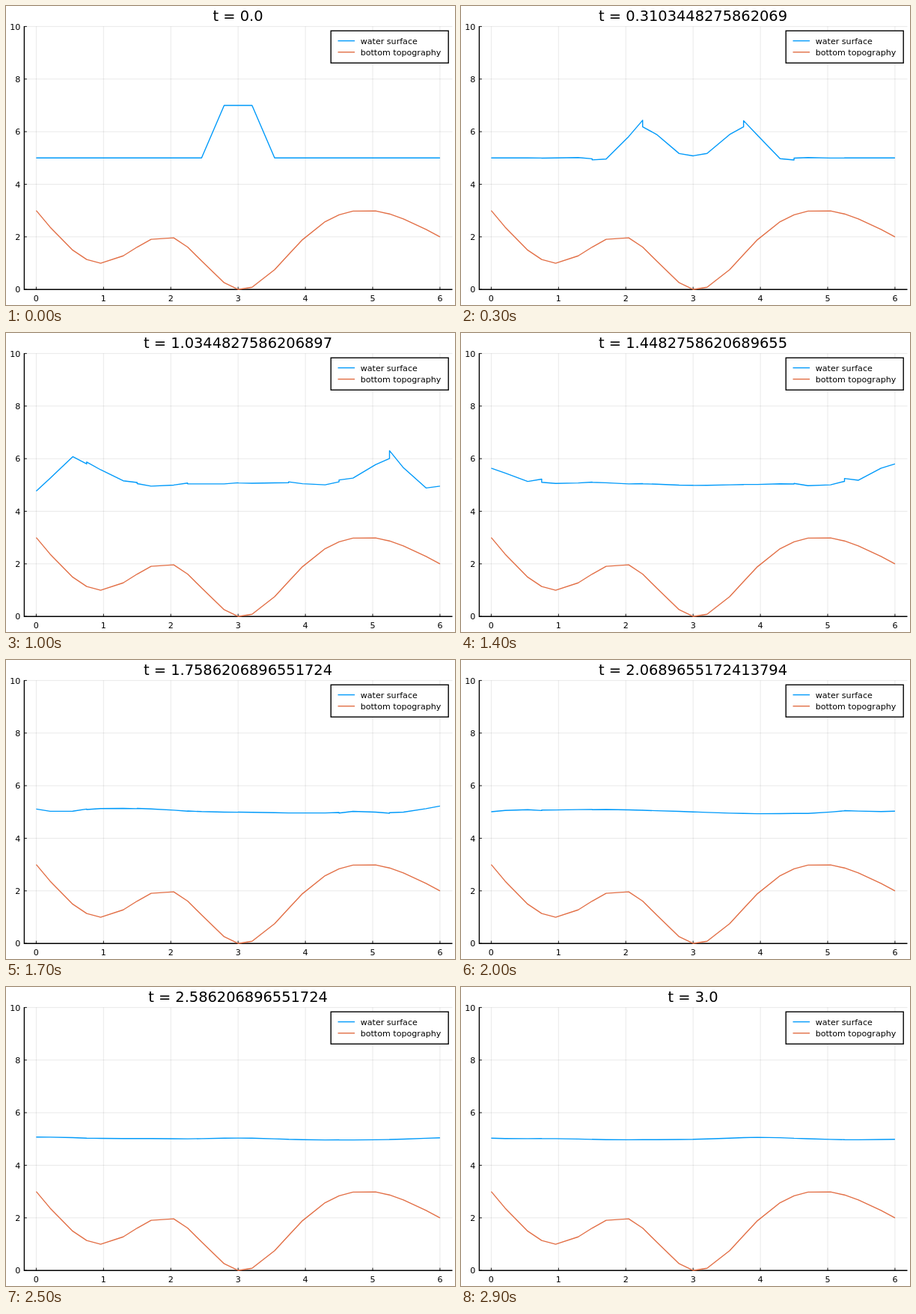
An HTML page that plays this animation: 600 px wide and 400 px high, repeating every 3000 ms.

```html
<!DOCTYPE html>
<html lang="en">
<head>
<meta charset="utf-8">
<title>Shallow water wave</title>
<style>
  html, body { margin: 0; width: 100%; height: 100%; overflow: hidden; background: #fff; }
  svg { display: block; width: 600px; height: 400px; font: 11.1px "DejaVu Sans", sans-serif; }
  path { fill: none; }
  .grid { stroke: #000; stroke-opacity: .1; stroke-width: .9; }
  .axis { stroke: #000; stroke-width: 1.4; }
  .tick { stroke: #000; stroke-width: .9; }
  .water, .bottom { stroke-width: 1.4; stroke-linejoin: round; }
  .water { stroke: #009afa; }
  .bottom { stroke: #e26f46; }
  #title { font-size: 19.4px; }
</style>
</head>
<body>
<svg viewBox="0 0 600 400">
  <path id="grid" class="grid"/>
  <path class="axis" d="M24.4 27V379.2H596.5"/>
  <path id="ticks" class="tick"/>
  <g id="labels"></g>
  <text id="title" x="310" y="19.7" text-anchor="middle"></text>
  <path id="water" class="water"/>
  <path id="bottom" class="bottom"/>
  <rect x="434.2" y="33.2" width="157" height="43" fill="#fff" stroke="#000" stroke-width="1.4"/>
  <path class="water" d="M443.5 46.6H466"/>
  <path class="bottom" d="M443.5 61.7H466"/>
  <text x="473.7" y="50.6">water surface</text>
  <text x="473.7" y="65.7">bottom topography</text>
</svg>
<script>
const $ = id => document.getElementById(id);
const px = x => 40.4 + 89.92 * x;
const py = y => 379.2 - 35.18 * y;

// Discontinuous Galerkin grid: 8 elements with 4 Gauss-Lobatto nodes each
const CELLS = 8, P = 4, SIZE = CELLS * P, LENGTH = 6;
const half = LENGTH / CELLS / 2;
const nodes = [-1, -Math.sqrt(0.2), Math.sqrt(0.2), 1];
const endWeight = 1 / 6;
const gravity = 1, restLevel = 5, humpLevel = 7;
const FRAMES = 30, FRAME_MS = 100, END = 3, SUBSTEPS = 40;

const bary = nodes.map((a, i) =>
  1 / nodes.reduce((p, b, j) => i === j ? p : p * (a - b), 1));
const D = nodes.map((a, i) => {
  const row = nodes.map((b, j) => i === j ? 0 : bary[j] / bary[i] / (a - b));
  row[i] = -row.reduce((s, v) => s + v, 0);
  return row;
});

// Natural cubic spline through unit-spaced heights
function spline(y) {
  const m = y.map(() => 0);
  for (let sweep = 0; sweep < 60; sweep++)
    for (let i = 1; i < y.length - 1; i++)
      m[i] = (6 * (y[i - 1] - 2 * y[i] + y[i + 1]) - m[i - 1] - m[i + 1]) / 4;
  return x => {
    const i = Math.min(Math.floor(x), y.length - 2), b = x - i, a = 1 - b;
    return a * y[i] + b * y[i + 1] +
      ((a ** 3 - a) * m[i] + (b ** 3 - b) * m[i + 1]) / 6;
  };
}

const xs = Array.from({ length: SIZE }, (_, i) =>
  half * (2 * Math.floor(i / P) + 1 + nodes[i % P]));
const bed = xs.map(spline([3, 1, 2, 0, 2, 3, 2]));

const flux = (h, q) => [q, q * q / h + gravity * h * h / 2];

// Local Lax-Friedrichs flux
function interfaceFlux(hl, ql, hr, qr) {
  const speed = Math.max(Math.abs(ql / hl), Math.abs(qr / hr)) +
    Math.sqrt(gravity * Math.max(hl, hr));
  const l = flux(hl, ql), r = flux(hr, qr);
  return [(l[0] + r[0] - speed * (hr - hl)) / 2,
          (l[1] + r[1] - speed * (qr - ql)) / 2];
}

// State holds depths first, then discharges
function rate(u) {
  const out = new Float64Array(2 * SIZE);
  for (let i = 0; i < SIZE; i++) {
    const first = i - i % P, h = u[i], q = u[SIZE + i];
    let dh = 0, dq = 0;
    for (let j = 0; j < P; j++) {
      const k = first + j, hk = u[k], qk = u[SIZE + k], d = D[i % P][j];
      dh += d * (q + qk);
      dq += d * ((q + qk) * (q / h + qk / hk) / 2 + gravity * h * (hk + bed[k]));
    }
    out[i] = -dh / half;
    out[SIZE + i] = -dq / half;
  }
  const correct = (i, star, sign) => {
    const own = flux(u[i], u[SIZE + i]), scale = sign / (endWeight * half);
    out[i] -= scale * (star[0] - own[0]);
    out[SIZE + i] -= scale * (star[1] - own[1]);
  };
  for (let c = 0; c <= CELLS; c++) {
    const r = c * P, l = r - 1;
    const left = c > 0 ? [u[l], u[SIZE + l]] : [restLevel - bed[0], 0];
    const right = c < CELLS ? [u[r], u[SIZE + r]] : [restLevel - bed[SIZE - 1], 0];
    const star = interfaceFlux(...left, ...right);
    if (c > 0) correct(l, star, 1);
    if (c < CELLS) correct(r, star, -1);
  }
  return out;
}

// Classic fourth-order Runge-Kutta
function step(u, dt) {
  const add = (k, s) => u.map((v, i) => v + s * k[i]);
  const a = rate(u), b = rate(add(a, dt / 2)), c = rate(add(b, dt / 2)), d = rate(add(c, dt));
  return u.map((v, i) => v + dt / 6 * (a[i] + 2 * b[i] + 2 * c[i] + d[i]));
}

const line = ys => "M" + xs.map((x, i) =>
  px(x).toFixed(2) + " " + py(ys[i]).toFixed(2)).join("L");

function simulate() {
  let u = new Float64Array(2 * SIZE);
  xs.forEach((x, i) => {
    u[i] = (Math.abs(x - 3) < 0.25 ? humpLevel : restLevel) - bed[i];
  });
  const dt = END / (FRAMES - 1) / SUBSTEPS, lines = [];
  for (let f = 0; f < FRAMES; f++) {
    lines.push(line(bed.map((b, i) => b + u[i])));
    for (let s = 0; s < SUBSTEPS; s++) u = step(u, dt);
  }
  return lines;
}

function drawAxes() {
  let grid = "", ticks = "", labels = "";
  for (let x = 0; x <= 6; x++) {
    grid += `M${px(x)} 27.4V379.2`;
    ticks += `M${px(x)} 379.2v-3.5`;
    labels += `<text x="${px(x)}" y="394.6" text-anchor="middle">${x}</text>`;
  }
  for (let y = 0; y <= 10; y += 2) {
    grid += `M24.4 ${py(y)}H596.5`;
    ticks += `M24.4 ${py(y)}h3.5`;
    labels += `<text x="19.4" y="${py(y) + 4.2}" text-anchor="end">${y}</text>`;
  }
  $("grid").setAttribute("d", grid);
  $("ticks").setAttribute("d", ticks);
  $("labels").innerHTML = labels;
  $("bottom").setAttribute("d", line(bed));
}

drawAxes();
const lines = simulate();
const start = performance.now();
let shown = -1;

function draw() {
  const f = Math.floor((performance.now() - start) / FRAME_MS) % FRAMES;
  if (f !== shown) {
    const t = END * f / (FRAMES - 1);
    $("title").textContent = "t = " + (Number.isInteger(t) ? t.toFixed(1) : t);
    $("water").setAttribute("d", lines[f]);
    shown = f;
  }
  requestAnimationFrame(draw);
}
draw();
</script>
</body>
</html>
```
